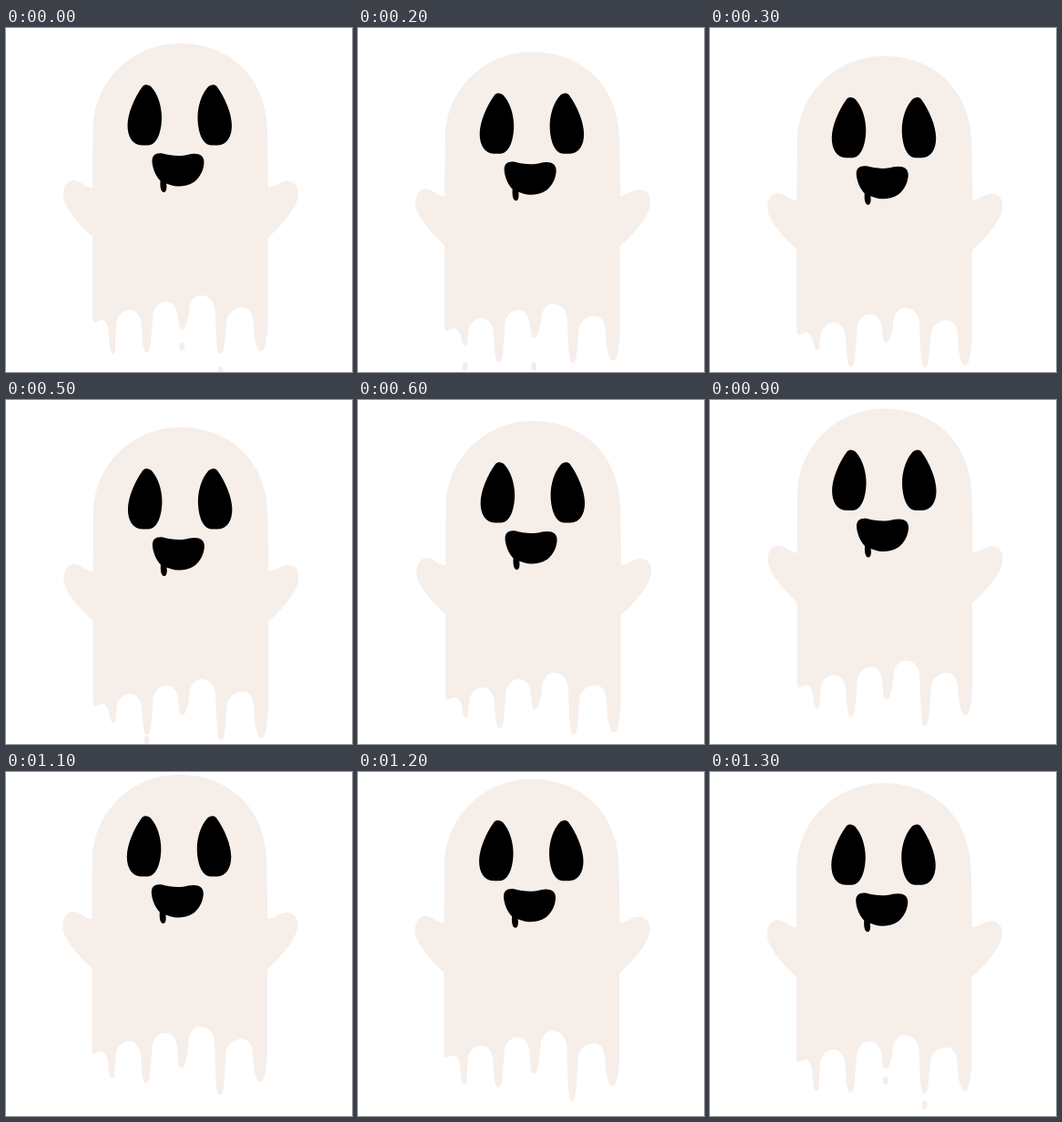
Animation, 380 px wide and 377 px high, one loop 1400 ms. Source, as an HTML page:

```html
<!DOCTYPE html>
<html lang="en">
<head>
<meta charset="utf-8">
<title>Dripping ghost</title>
<style>
html, body { margin: 0; height: 100%; overflow: hidden; background: #fff; }
svg { display: block; width: 100%; height: 100%; }
</style>
</head>
<body>
<svg viewBox="0 0 380 377">
  <g id="ghost">
    <path id="body" fill="#f6eee9"/>
    <path id="eye" d="M150 64C152 61.5 157 61.5 160 65C167 73 171 86 171 98C171 113 166 128.5 156 128.5H149C139 128.5 133.5 119 133.5 107C133.5 94 141 76 150 64Z"/>
    <use href="#eye" transform="matrix(-1 0 0 1 381.5 0)"/>
    <path d="M160.5 147C160 139 165 136.5 172 137.5C180 139.5 190 141.5 201 138.5C211 136.5 217.5 139.5 217.5 147C217.5 155 213 164 207 168.5C201 172.5 195 173.5 189 173.5C184 173.5 180 172 176 170.5C177 175 176 180 173.5 180C170 180 169 174 169.5 167.5C164 162 161 153 160.5 147Z"/>
  </g>
  <g id="drops" fill="#f6eee9"></g>
</svg>
<script>
const STEP = 100, COUNT = 14, FALL = 11;
const $ = id => document.getElementById(id);

// Keys are [step, value] pairs, interpolated linearly
function at(keys, n) {
  const i = keys.findIndex(k => k[0] > n);
  const [a, u] = keys[i - 1], [b, v] = keys[i];
  return u + (v - u) * (n - a) / (b - a);
}

const bob = [[-3, -14], [4, 18.5], [5, 13], [7, -1], [11, -14], [18, 18.5]];
const sway = [[0, 0], [5, .4], [7, 1.8], [11, -.7], [14, 0]];

// A drip hangs at x between l and r, after an arch with crown (ax, ay).
// It grows from tip, then lets go of a drop at height y on step free.
const drips = [
  { ax: 105, ay: 320, l: 113, r: 121, x: 117.5, tip: 339, grow: 18, free: 1, y: 360 },
  { ax: 136, ay: 309, l: 149, r: 161, x: 154.5, tip: 354, grow: 4, free: 5, y: 373 },
  { ax: 176, ay: 300, l: 189, r: 201, x: 193, tip: 330, grow: 10, free: 13, y: 338 },
  { ax: 214, ay: 293, l: 230, r: 242, x: 235.5, tip: 357, grow: 13, free: 13, y: 365 },
  { ax: 260, ay: 306.5, l: 272, r: 287.5, x: 280, tip: 353, grow: 5, free: 7, y: 380 }
];
for (const d of drips) {
  d.drop = document.createElementNS("http://www.w3.org/2000/svg", "ellipse");
  d.drop.setAttribute("cx", d.x);
  d.drop.setAttribute("rx", 3);
  d.drop.setAttribute("ry", 4.7);
  $("drops").append(d.drop);
}

const age = (d, n) => (n - d.free + COUNT) % COUNT;

function outline(n) {
  let p = "M287.5 325V230C302 217 311 206 316 197C323 186 324 169 310 168C302 167 297 174 288 175" +
    "L287 113C286 53 245 17 191 17C139 17 97 57 95.5 110L95 175C87 175 82 167 74 167" +
    "C62 168 60 186 67 196C73 207 82 217 95 229V316C95 324 98 323 99 322Q102 320 105 320";
  drips.forEach((d, i) => {
    const t = d.tip + d.grow * (age(d, n) / (COUNT - 1)) ** 2;
    const next = drips[i + 1] || { ax: 310, ay: 310 };
    const left = Math.min(d.ay + 20, t - 10), right = Math.min(next.ay + 18, t - 8);
    p += `C${(d.ax + d.l) / 2 + 1} ${d.ay} ${d.l} ${d.ay + 7} ${d.l} ${left}`;
    p += `C${d.l + 1} ${t - 6} ${d.x - 3} ${t} ${d.x} ${t}`;
    p += `C${d.x + 4} ${t} ${d.r - 2} ${t - 7} ${d.r} ${right}`;
    if (i < drips.length - 1) {
      p += `C${d.r} ${next.ay + 7} ${(d.r + next.ax) / 2 - 1} ${next.ay} ${next.ax} ${next.ay}`;
    }
  });
  return p + "Z";
}

function draw(now) {
  const n = Math.floor(now / STEP) % COUNT;
  $("body").setAttribute("d", outline(n));
  $("ghost").setAttribute("transform", `translate(${at(sway, n)} ${at(bob, n)})`);
  for (const d of drips) d.drop.setAttribute("cy", d.y + FALL * age(d, n));
}

const start = performance.now();
function loop() {
  draw(performance.now() - start);
  requestAnimationFrame(loop);
}
loop();
</script>
</body>
</html>
```
